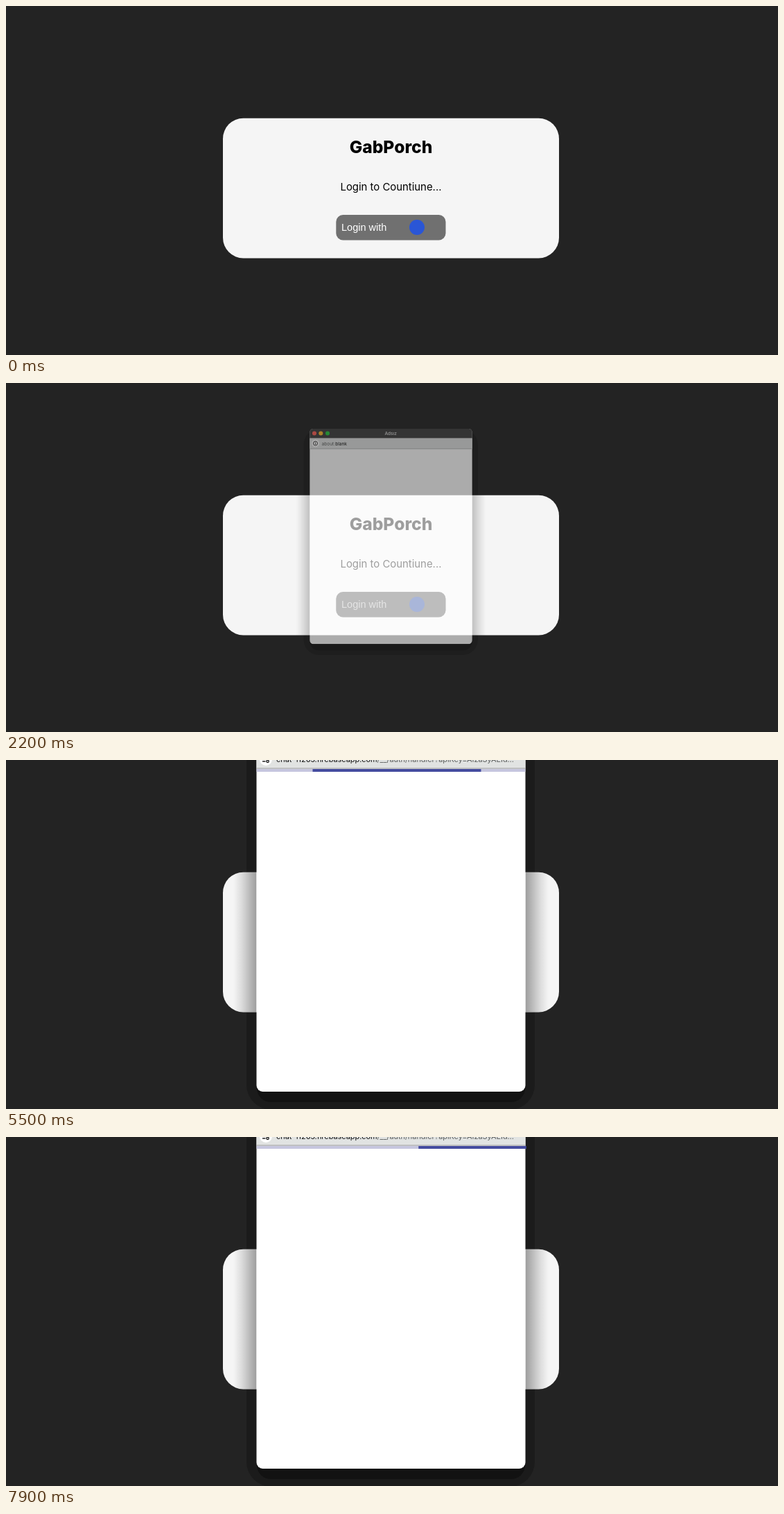
These frames come from a looping animation (1114 px wide and 503 px high, 8000 ms). An HTML page:

```html
<!DOCTYPE html>
<html lang="en">
<head>
<meta charset="utf-8">
<title>Login popup</title>
<style>
  html, body { margin: 0; width: 100%; height: 100%; overflow: hidden; background: #232323; }
  svg { display: block; }
  text { font-family: Inter, sans-serif; white-space: pre; }
  .mid { text-anchor: middle; }
  .url { font-size: 10.9px; fill: #111; }
  .soft { fill: #5c5f5e; }
</style>
</head>
<body>
<svg width="1114" height="503" viewBox="0 0 1114 503">
  <defs>
    <linearGradient id="fade">
      <stop offset="0" stop-opacity="0"/>
      <stop offset=".35" stop-opacity=".1"/>
      <stop offset="1" stop-opacity=".36"/>
    </linearGradient>
    <clipPath id="cardClip"><rect x="313" y="161.7" width="485" height="201.8" rx="29.5"/></clipPath>
    <clipPath id="winClip"><rect x="361.5" y="-36" width="388" height="514" rx="9"/></clipPath>
  </defs>

  <!-- popup shadow on the page -->
  <g class="pop" id="shadow">
    <rect x="347" y="-34" width="416" height="538" rx="36" fill="#1b1b1b"/>
    <rect x="362" y="0" width="387" height="493" rx="20" fill="#121212"/>
  </g>
  <rect class="pop" x="361.5" y="-36" width="388" height="514" rx="9" fill="#232323"/>

  <!-- login card -->
  <rect x="313" y="161.7" width="485" height="201.8" rx="29.5" fill="#f5f5f5"/>
  <text class="mid" x="555.5" y="212" font-size="24.6" font-weight="800">GabPorch</text>
  <text class="mid" x="555.5" y="266" font-size="14.9">Login to Countiune...</text>
  <rect x="476.3" y="301" width="158.2" height="36.5" rx="10" fill="#707070"/>
  <text x="484" y="324.3" font-size="14.5" fill="#fff" style="font-family:'Liberation Sans',Arial,sans-serif">Login with</text>
  <circle cx="593" cy="319" r="11" fill="#2a56d6"/>
  <rect id="dim" x="476.3" y="301" width="158.2" height="36.5" rx="10"/>

  <!-- popup shadow on the card -->
  <g clip-path="url(#cardClip)">
    <g class="pop" id="shade">
      <rect x="328" y="0" width="33.5" height="478" fill="url(#fade)"/>
      <rect x="328" y="0" width="33.5" height="478" fill="url(#fade)" transform="matrix(-1 0 0 1 1111 0)"/>
    </g>
  </g>

  <!-- popup window -->
  <g class="pop" id="win">
    <g clip-path="url(#winClip)">
      <rect x="361" y="-36" width="389" height="514" fill="#fff"/>
      <rect x="361" y="-36" width="389" height="23" fill="#404040"/>
      <circle cx="372.5" cy="-25" r="5" fill="#ff5f57"/>
      <circle cx="388" cy="-25" r="5" fill="#febc2e"/>
      <circle cx="404" cy="-25" r="5" fill="#28c840"/>
      <text class="mid" x="555" y="-21.5" font-size="10.5" font-weight="600" fill="#d0d0d0">Adsız</text>
      <rect x="361" y="-13" width="389" height="24.5" fill="#e1e3e2"/>
      <rect x="361" y="11" width="389" height="2" fill="#bfc0c0"/>
      <circle cx="375" cy="-1" r="9" fill="#fff"/>
      <g id="blank">
        <circle cx="375" cy="-.8" r="5" fill="none" stroke="#222" stroke-width="1.4"/>
        <path d="M375-1.3v3.2M375-3.8v1.3" stroke="#222" stroke-width="1.5"/>
        <text class="url" x="390" y="3.4"><tspan class="soft">about:</tspan>blank</text>
      </g>
      <g id="page">
        <path d="M370 1.9h4.5M375.5-3.2h4.5" stroke="#222" stroke-width="1.5"/>
        <circle cx="377.6" cy="1.9" r="1.6" fill="none" stroke="#222" stroke-width="1.4"/>
        <circle cx="372.4" cy="-3.2" r="1.6" fill="none" stroke="#222" stroke-width="1.4"/>
        <text class="url" x="390" y="3.4">chat-11265.firebaseapp.com<tspan class="soft">/__/auth/handler?apiKey=AIzaSyAEId…</tspan></text>
      </g>
      <rect id="track" x="361" y="13" width="389" height="4" fill="#c6c6df"/>
    </g>
    <rect id="bar" y="13" height="4" fill="#444b9f"/>
  </g>
</svg>
<script>
const LOOP = 8000, STEP = 100;
const $ = id => document.getElementById(id);
const pops = document.querySelectorAll('.pop');
const show = (el, on) => { el.style.display = on ? '' : 'none'; };
const clamp = v => Math.max(0, Math.min(1, v));

// Left and right ends of the indeterminate bar, as fractions of the track.
function barEnds(ms) {
  const p = ms / 2000 % 1;
  if (p < .5) return [p * .5, p * 2];
  if (p < .75) return [.25 + (p - .5) * 3, 1];
  return [0, 0];
}

function draw(t) {
  $('dim').setAttribute('opacity', .27 * clamp((t - 400) / 300));

  const opening = t < 2300;
  const scale = opening ? .604 : 1;
  for (const el of pops) {
    show(el, t >= 2200);
    el.setAttribute('transform', `translate(555.5 221) scale(${scale}) translate(-555.5 -221)`);
  }
  $('win').setAttribute('opacity', opening ? .62 : 1);
  $('shade').setAttribute('opacity', opening ? .6 : 1);
  $('shadow').setAttribute('opacity', opening ? .6 : 1);

  show($('blank'), t < 4700);
  show($('page'), t >= 4700);

  const loading = t >= 5200;
  show($('track'), loading);
  show($('bar'), loading);
  if (loading) {
    const [a, b] = barEnds(t - 4665);
    $('bar').setAttribute('x', 361.5 + 388 * a);
    $('bar').setAttribute('width', b > a ? 388 * (b - a) + (b === 1 ? 1.3 : 0) : 0);
  }
}

const start = performance.now();
function tick() {
  const t = (performance.now() - start) % LOOP;
  draw(Math.floor(t / STEP) * STEP);
  requestAnimationFrame(tick);
}
tick();
</script>
</body>
</html>
```
